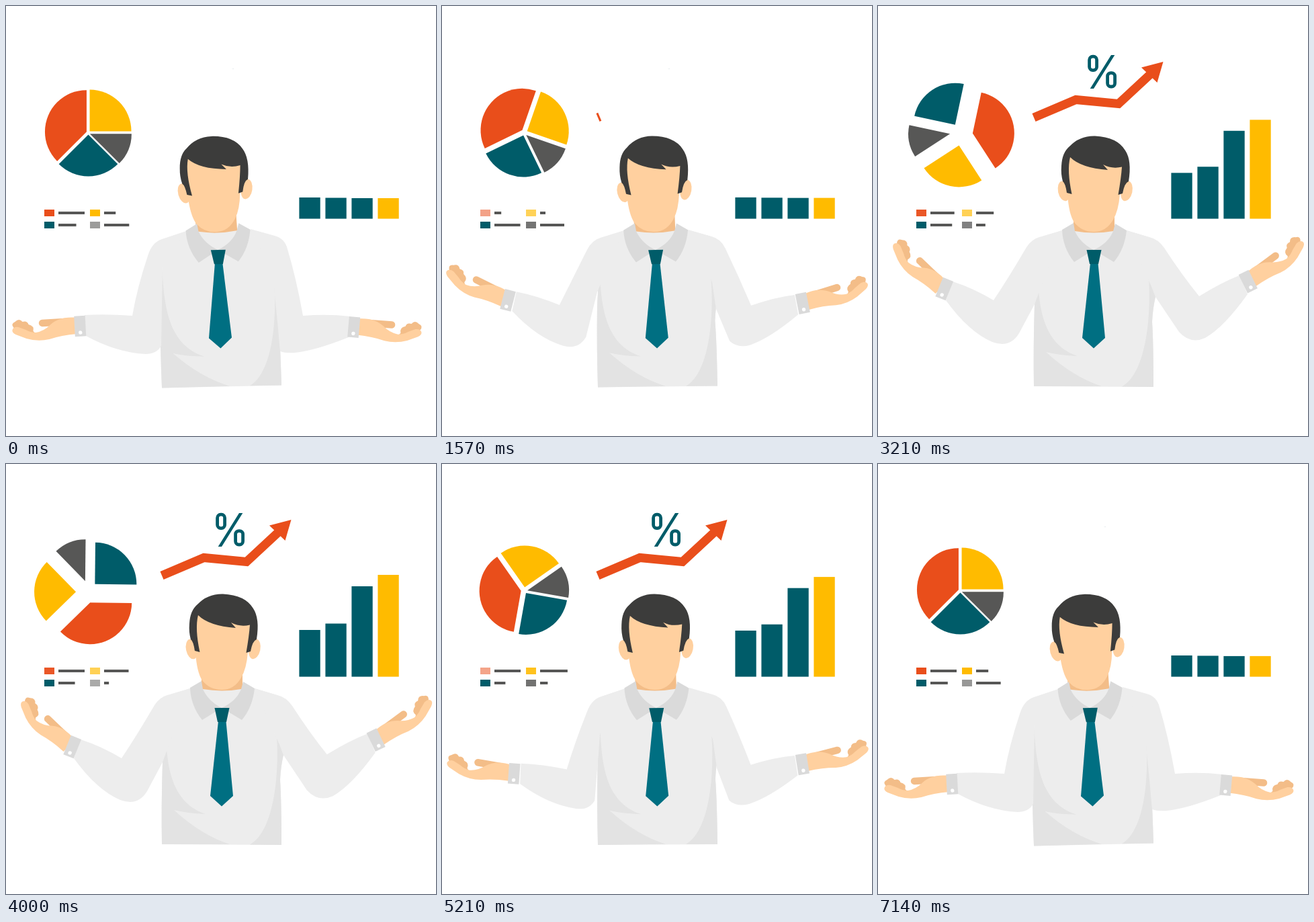
These frames come from a looping animation (640 by 640 pixels, 7.21 s). An HTML page with a canvas:

```html
<!DOCTYPE html>
<html lang="en">
<head>
<meta charset="utf-8">
<title>Business presentation</title>
<style>
  html, body { margin: 0; height: 100%; overflow: hidden; background: #fff; }
  canvas { display: block; width: 100vw; height: 100vh; }
</style>
</head>
<body>
<canvas id="stage" width="640" height="640"></canvas>
<script>
const ctx = document.getElementById('stage').getContext('2d');
const LOOP = 7210, STEPS = 101, TAU = Math.PI * 2, RAD = Math.PI / 180;

const RED = '#e94e1b', YELLOW = '#ffbb00', TEAL = '#005c69', GRAY = '#575756';
const SKIN = '#ffd09f', SKIN_DARK = '#f3bd88', HAIR = '#3c3c3b';
const SHIRT = '#ededed', SHADE = '#e3e3e3', COLLAR = '#dadada', TIE = '#006f82';

// ---- helpers ----
const lerp = (a, b, p) => a + (b - a) * p;
const clamp = x => Math.min(1, Math.max(0, x));
const ease = (t, start, end) => (1 - Math.cos(Math.PI * clamp((t - start) / (end - start)))) / 2;
// rises to 1 and falls back to 0
const swing = (t, upStart, upEnd, downStart, downEnd) => ease(t, upStart, upEnd) - ease(t, downStart, downEnd);
// cosine wave from -1 to 1, highest at time "peak"
const wave = (t, peak, cycles = 1) => Math.cos(TAU * cycles * (t - peak) / LOOP);

function fill(path, color) {
  ctx.fillStyle = color;
  ctx.fill(new Path2D(path));
}
function rect(x, y, w, h, color) {
  ctx.fillStyle = color;
  ctx.fillRect(x, y, w, h);
}
function group(draw) {
  ctx.save();
  draw();
  ctx.restore();
}
function rotateAbout(x, y, degrees) {
  ctx.translate(x, y);
  ctx.rotate(degrees * RAD);
  ctx.translate(-x, -y);
}
// blends two paths of equal structure
function mixPaths(a, b, p) {
  const ends = b.match(/[\d.]+/g);
  let i = 0;
  return a.replace(/[\d.]+/g, n => lerp(+n, +ends[i++], p).toFixed(2));
}

// ---- charts ----
const SLICES = [ // color, from, to, direction of drift
  [YELLOW, 0, 90, 45], [GRAY, 90, 135, 125], [TEAL, 135, 225, 180], [RED, 225, 360, 298]
];
function drawPie(t) {
  const spread = 14 * swing(t, 1227, 2760, 3797, 5642);
  group(() => {
    ctx.translate(122.5, 188.5);
    ctx.rotate(TAU * ease(t, 741, 6341));
    ctx.translate(0, -spread * 0.2);
    for (const [color, from, to, drift] of SLICES) {
      const d = 2.9 + spread, x = d * Math.sin(drift * RAD), y = -d * Math.cos(drift * RAD);
      ctx.fillStyle = color;
      ctx.beginPath();
      ctx.moveTo(x, y);
      ctx.arc(x, y, 62, (from - 90) * RAD, (to - 90) * RAD);
      ctx.fill();
    }
  });
}

function drawLegend(t) {
  const item = (x, y, color, alpha, length) => {
    ctx.globalAlpha = alpha;
    rect(x, y, 15, 10, color);
    ctx.globalAlpha = 1;
    rect(x + 21, y + 3, length, 4, GRAY);
  };
  const dip = swing(t, 0, 1800, 1800, 3600);
  item(57, 303, RED, 0.75 + 0.25 * wave(t, 0, 2), 39 - 30 * dip);
  item(57, 321, TEAL, 1, 27.5 + 11.5 * wave(t, 1900));
  item(125, 303, YELLOW, 0.78 + 0.22 * wave(t, 0, 3), 24.5 + 17 * wave(t, 4900));
  item(125, 321, GRAY, 0.75 + 0.25 * wave(t, 2300, 2), 23.5 + 17 * wave(t, 715));
}

function drawBars(t) {
  const fall = clamp((t - 5050) / 2090) ** 1.43;
  const grow = ease(t, 1500, 3450) - fall;
  [38, 48, 104, 121].forEach((extra, i) => {
    const top = [285, 285.5, 286, 286][i] - extra * grow;
    rect(436.4 + 39 * i, top, 31.3, 316.6 - top, i === 3 ? YELLOW : TEAL);
  });
}

function drawArrow(t) {
  const shown = swing(t, 1500, 2400, 5530, 6200);
  if (shown < 0.002) return;
  const length = 200;
  group(() => {
    ctx.strokeStyle = RED;
    ctx.lineWidth = 13;
    ctx.setLineDash([length * shown, 999]);
    ctx.stroke(new Path2D('M232 166 L294.5 139.5 L358 145.5 L407 100'));
  });
  const head = clamp((shown - 0.85) / 0.15);
  group(() => {
    ctx.translate(403, 103);
    ctx.scale(head, head);
    ctx.translate(-403, -103);
    fill('M424.5 83 L392 91.5 L415.5 114 Z', RED);
  });
}

function drawPercent(t) {
  const size = 0.05 + 0.95 * swing(t, 1570, 2330, 5550, 6350);
  group(() => {
    ctx.translate(338, 93.5);
    ctx.scale(size, size * size);
    ctx.translate(-338, -93.5);
    fill('M347 73 L352.3 73 L321 123 L315.7 123 Z', TEAL);
    ctx.strokeStyle = TEAL;
    ctx.lineWidth = 4.8;
    ctx.beginPath();
    ctx.roundRect(314.6, 75.2, 11, 20.4, 5);
    ctx.roundRect(341.6, 99.6, 11, 20.4, 5);
    ctx.stroke();
  });
}

// ---- man ----
const LEFT = {
  side: 1,
  low: 'M268 335 L232 347 Q217 352 211 372 Q195 420 188 461 Q150 458 117 460 L119 491 Q165 516 208 518 Q224 518 231 506 L233 385 Z',
  high: 'M274 334 L240 344 Q229 347 221 359 Q196 402 172 438 Q142 420 111 410 L101 438 Q135 485 170 500 Q196 510 210 487 L233 444 L238 385 Z',
  cuff: [110, 476.5, 98.5, 421], tilt: [-3, 22], hand: [0, 47]
};
const RIGHT = {
  side: -1,
  low: 'M364 332 L400 342 Q415 346 419 362 Q432 405 442 461 Q480 458 512 462 L510 493 Q460 513 430 516 Q416 517 408 514 L404 470 L397 400 Z',
  high: 'M370 334 L404 344 Q417 347 426 360 Q452 400 478 432 Q512 411 538 401 L550 429 Q515 478 487 494 Q465 504 448 485 L413 433 L408 420 L403 405 Z',
  cuff: [518, 478, 551, 410], tilt: [-5, 26], hand: [-1, 40]
};

function drawHand() {
  ctx.strokeStyle = SKIN_DARK;
  ctx.lineWidth = 10.5;
  ctx.lineCap = 'round';
  ctx.stroke(new Path2D('M-48.5 -5 L-15 -7'));
  fill('M-91 2 Q-96 -4 -89 -7 Q-83 -13 -78 -7 Q-71 -9 -69 -3 Q-60 -1 -62 7 L-58 11 L-85 6 Z', SKIN_DARK);
  fill('M3 -13 C-16 -15 -28 -10 -36 -3 Q-46 7 -58 9 Q-66 9 -73 5 L-84 1 Q-91 0 -93 5 Q-94 9 -88 12 L-72 18 Q-55 23 -38 19 Q-20 13 3 11 Z', SKIN);
}

function drawArm(arm, raise, handRaise, lean) {
  const [x0, y0, x1, y1] = arm.cuff;
  const tilt = lerp(...arm.tilt, raise);
  const bow = 4 * raise * (1 - raise) * 2.5 * arm.side;
  group(() => {
    ctx.translate(7 * (lean - raise), 0);
    fill(mixPaths(arm.low, arm.high, raise), SHIRT);
    ctx.translate(lerp(x0, x1, raise) - bow, lerp(y0, y1, raise));
    ctx.scale(arm.side, 1);
    ctx.rotate(tilt * RAD);
    group(() => {
      ctx.translate(-7.5, 0);
      ctx.rotate((lerp(...arm.hand, handRaise) - tilt) * RAD);
      drawHand();
    });
    rect(-8, -15.3, 16.5, 30.6, COLLAR);
    ctx.fillStyle = '#fff';
    ctx.beginPath();
    ctx.arc(0.3, 9.6, 2.7, 0, TAU);
    ctx.fill();
  });
}

function drawEar(x, angle) {
  ctx.fillStyle = SKIN;
  ctx.beginPath();
  ctx.ellipse(x, 275.5, 8.5, 15, angle * RAD, 0, TAU);
  ctx.fill();
}

function drawHead() {
  drawEar(276.5, -12);
  drawEar(370, 12);
  fill('M284 224 Q280 250 282 280 Q284 310 292 322 Q303 336 321 336 Q340 336 350 318 Q358 305 360 280 L364 235 Z', SKIN);
  fill('M288.5 280 L281 278 Q279 264 275 261 Q272 250 273 238 Q274 218 285 209 Q300 193 323 193.5 Q356 195 368 215 Q378 230 373 261 Q367 263 364 279 L357.5 281 Q362 255 363 239.5 Q348 243 335 236 L342 244 Q302 241 286 225 Q281 245 288.5 280 Z', HAIR);
}

function drawMan(t) {
  const lean = swing(t, 434, 3040, 3889, 6919);
  const leftRaise = swing(t, 0, 2500, 4150, 5800);
  const leftHand = swing(t, 250, 2500, 4150, 5800);
  const rightRaise = swing(t, 380, 2686, 3844, 6444);
  const tiltTorso = () => rotateAbout(321, 566, -1.6 * (1 - lean));
  const tiltHead = () => rotateAbout(320, 450, -3.9 * (1 - lean));

  group(() => {
    tiltHead();
    fill('M291 310 L291 340 L352 340 L352 310 Z', SKIN_DARK);
  });
  group(() => {
    tiltTorso();
    fill('M274 334 L240 345 L238 385 L233 444 Q231 510 232 566 L410 567 Q410 500 408 470 Q409 450 413 433 L410 380 L403 344 L370 334 L350 335 Q321 340 293 335 Z', SHIRT);
    fill('M237 385 C239 440 241 502 297 521 Q270 520 250 515 Q290 552 333 566 L232 566 Q231 510 233 444 Z', SHADE);
    fill('M403 405 C407 470 397 548 363 566.5 L410 567 Q410 500 408 470 Q409 450 413 433 Z', SHADE);
  });
  drawArm(LEFT, leftRaise, leftHand, lean);
  drawArm(RIGHT, rightRaise, rightRaise, lean);
  group(() => {
    tiltTorso();
    fill('M291 323 L274 333 Q275 360 292 381 L321 363 Q301 353 293 335 Z', COLLAR);
    fill('M353 324 L370 334 Q367 362 351 381 L321 363 Q343 353 350 335 Z', COLLAR);
    fill('M316 383 L327.5 383 L338 494 L321 509.5 L304 494 Z', TIE);
    fill('M310.5 363 L332.5 363 L328 384 L315 384 Z', TEAL);
  });
  group(() => {
    tiltHead();
    drawHead();
  });
}

function render(now) {
  const step = LOOP / STEPS;
  const t = Math.floor((now + 3) / step) % STEPS * step;
  rect(0, 0, 640, 640, '#fff');
  drawPie(t);
  drawLegend(t);
  drawBars(t);
  drawArrow(t);
  drawPercent(t);
  drawMan(t);
  requestAnimationFrame(() => render(performance.now()));
}
render(performance.now());
</script>
</body>
</html>
```
